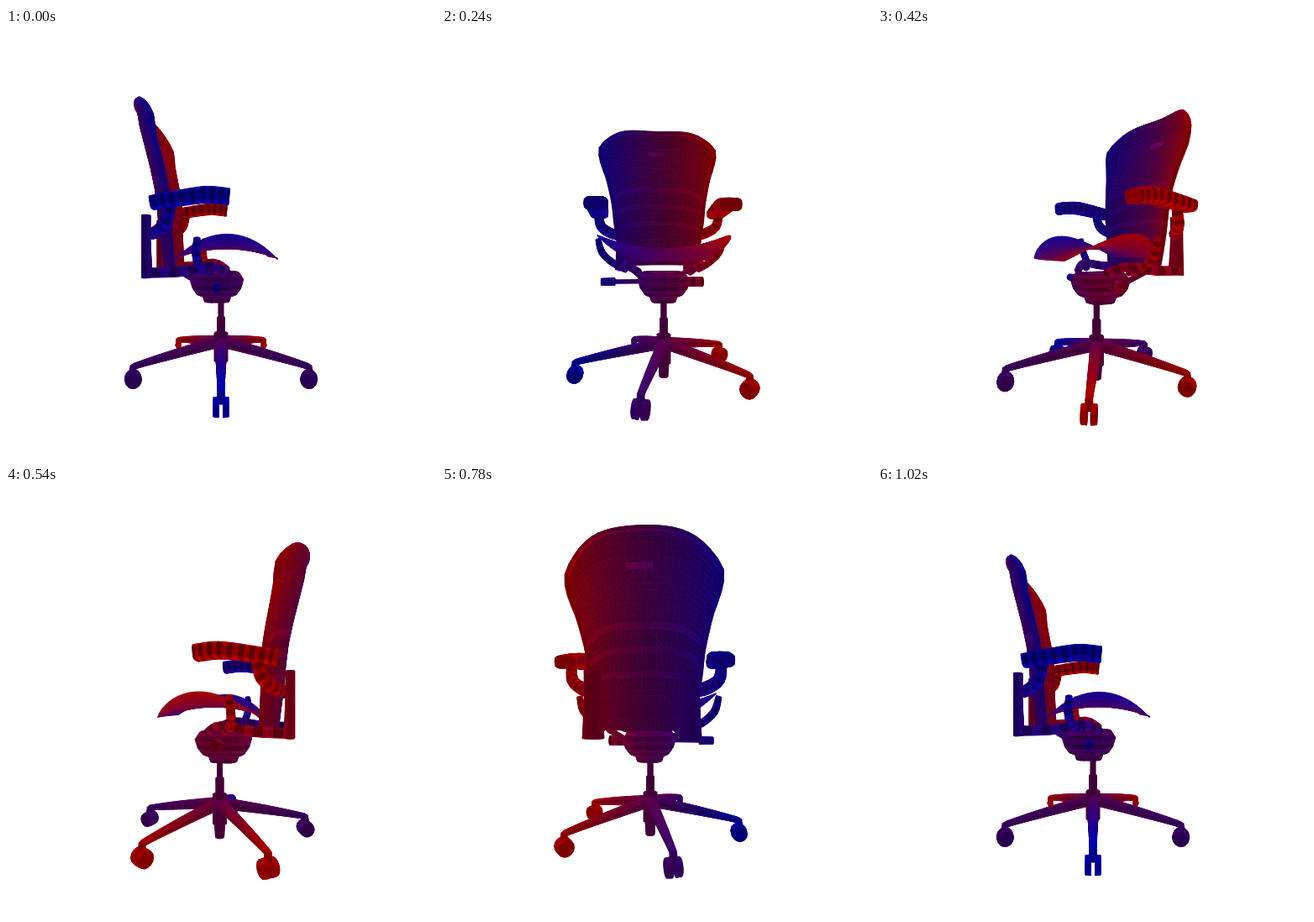
Write an HTML page with a canvas that moves like this. It is 512x512 px and loops after 1.08 s.

```html
<!DOCTYPE html>
<html>
<head>
<meta charset="utf-8">
<title>Turning chair</title>
<style>
html, body { margin: 0; height: 100%; overflow: hidden; background: #fff; }
canvas { display: block; width: 512px; height: 512px; }
</style>
</head>
<body>
<canvas id="stage" width="512" height="512"></canvas>
<script>
const ctx = document.getElementById('stage').getContext('2d');
const CAMERA = 443, MID = 256, SHIFT = -8, STEP = 60, FRAMES = 18;
const UP = [0, 1, 0], AHEAD = [1, 0, 0], SIDE = [0, 0, 1];
const faces = [];

// Vectors: x forward, y up, z towards the blue side
const sub = (a, b) => a.map((n, i) => n - b[i]);
const cross = (a, b) => [a[1] * b[2] - a[2] * b[1], a[2] * b[0] - a[0] * b[2], a[0] * b[1] - a[1] * b[0]];
const unit = a => { const l = Math.hypot(...a) || 1; return a.map(n => n / l); };
const bend = (n, power) => Math.sign(n) * Math.abs(n) ** power;

function sample(list, v) {
  const p = v * (list.length - 1), i = Math.min(Math.floor(p), list.length - 2);
  return list[i] + (list[i + 1] - list[i]) * (p - i);
}

function spline(path, t) {
  const last = path.length - 1;
  const i = Math.max(0, Math.min(Math.floor(t), last - 1)), f = t - i;
  const [a, b, c, d] = [-1, 0, 1, 2].map(k => path[Math.max(0, Math.min(last, i + k))]);
  return b.map((n, k) => n + f / 2 * (c[k] - a[k] +
    f * (2 * a[k] - 5 * n + 4 * c[k] - d[k] + f * (3 * (n - c[k]) + d[k] - a[k]))));
}

function grid(point, nu, nv, tone = () => 1, wheel = false) {
  for (let i = 0; i < nu; i++) for (let j = 0; j < nv; j++) {
    const at = (a, b) => point((i + a) / nu, (j + b) / nv);
    faces.push({ pts: [at(0, 0), at(1, 0), at(1, 1), at(0, 1)], tone: tone(i, j), wheel });
  }
}

// A tube through points [x, y, z, radius]; flat widens it along ref, a low power squares it
function tube(path, { ref = SIDE, flat = 1, power = 1, steps = 4, sides = 10, tone, wheel = false } = {}) {
  const last = path.length - 1;
  const skin = (u, v) => {
    const t = u * last, p = spline(path, t), a = v * 2 * Math.PI;
    const dir = unit(sub(spline(path, t + .02), spline(path, t - .02)).slice(0, 3));
    const m = unit(cross(dir, ref)), n = cross(m, dir);
    const c = bend(Math.cos(a), power), s = flat * bend(Math.sin(a), power);
    return [0, 1, 2].map(k => p[k] + p[3] * (m[k] * c + n[k] * s));
  };
  grid(skin, last * steps, sides, tone, wheel);
  for (const u of [0, 1]) {
    const pts = Array.from({ length: sides }, (_, j) => skin(u, j / sides));
    faces.push({ pts, tone: 1, wheel });
  }
}

const bands = i => i % 2 ? .78 : 1.15;

function buildBase() {
  tube([[0, -70, 0, 3], [0, -94, 0, 3]]);
  tube([[0, -90, 0, 4.5], [0, -112, 0, 4.5]]);
  tube([[0, -109, 0, 8], [0, -143, 0, 8]], { steps: 6 });
  tube([[0, -143, 0, 6], [0, -159, 0, 5]]);
  for (let k = 0; k < 5; k++) {
    const a = k * 2 * Math.PI / 5, s = Math.sin(a), c = Math.cos(a), tangent = [c, 0, -s];
    const out = (r, y, w, side = 0) => [r * s + side * c, y, r * c - side * s, w];
    tube([out(5, -120, 6.5), out(55, -129, 5), out(99, -138, 3.3), out(104, -141, 3.3), out(104, -149, 3.3)],
      { ref: tangent });
    for (const w of [-1, 1])
      tube([out(104, -153, 9, w * 2), out(104, -153, 8.5, w * 7)],
        { ref: UP, steps: 1, sides: 14, wheel: true });
  }
}

function buildMechanism() {
  const rings = [[6, -36], [27, -36], [32, -44], [29, -54], [24, -61], [17, -64], [15, -70], [2, -71]];
  grid((u, v) => {
    const a = v * 2 * Math.PI, r = sample(rings.map(p => p[0]), u);
    return [-5 + r * bend(Math.cos(a), .65), sample(rings.map(p => p[1]), u), r * .95 * bend(Math.sin(a), .65)];
  }, 14, 20, i => i % 2 ? .8 : 1.1);
  tube([[-4, -46, 25, 2], [-4, -46, 60, 2]], { ref: UP });
  tube([[-4, -46, 58, 4.5], [-4, -46, 74, 4]], { ref: UP });
  tube([[-4, -47, -28, 5.5], [-4, -47, -48, 5.5]], { ref: UP, tone: bands });
}

function buildSeat() {
  grid((u, v) => {
    const a = 2 * u - 1, b = 2 * v - 1;
    return [
      6 + 61 * a - 5 * a * b * b,
      -7 - 11 * a * a + 16 * b * b * (1 - a * a),
      78 * b * Math.sqrt(1 - .75 * a * a)
    ];
  }, 20, 24);
}

function back(u, v) {
  return [
    sample([-68, -71, -74, -76, -79, -84, -90, -96, -100], v) + (16 + 14 * v) * u * u,
    -30 + v * (190 - 31 * u ** 4),
    u * sample([48, 52, 55, 58, 60, 64, 69, 76, 78], v)
  ];
}

function buildBack() {
  grid((u, v) => back(2 * u - 1, v), 24, 32, (i, j) => {
    if (j === 26 && i > 9 && i < 14) return 1.3;
    return j > 5 && j < 19 && j % 4 === 1 ? 1.1 : .95;
  });
  const rim = [];
  for (let k = 0; k <= 8; k++) rim.push([...back(-1, k / 8), 2.5]);
  for (let k = 1; k < 12; k++) rim.push([...back(k / 6 - 1, 1), 2.5]);
  for (let k = 8; k >= 0; k--) rim.push([...back(1, k / 8), 2.5]);
  tube(rim, { ref: AHEAD, steps: 2, sides: 6 });
}

function buildArm(s) {
  tube([[-69, 40, 80 * s, 6.5], [-45, 44, 80 * s, 7], [-15, 48, 80 * s, 7.5], [8, 46, 80 * s, 7.5]],
    { flat: 1.75, power: .5, steps: 6, sides: 16, tone: bands });
  tube([[-50, 38, 80 * s, 5], [-55, 22, 77 * s, 6], [-65, 13, 64 * s, 6.5], [-74, 10, 52 * s, 6]],
    { ref: AHEAD, tone: bands });
  tube([[-81, 30, 48 * s, 4.5], [-81, 0, 48 * s, 4.5], [-80, -37, 48 * s, 5.5]], { flat: 2, steps: 6 });
  tube([[-80, -32, 52 * s, 5], [-45, -31, 52 * s, 5], [-10, -26, 46 * s, 4.5], [8, -34, 30 * s, 4]],
    { ref: UP, tone: bands });
  tube([[-24, 5, 79 * s, 3], [-25, -12, 74 * s, 4], [-22, -25, 60 * s, 4], [-12, -32, 44 * s, 4]],
    { ref: AHEAD, tone: bands });
  tube([[-45, -31, 40 * s, 3], [-25, -46, 22 * s, 3]], { ref: UP });
}

function draw(angle) {
  const cos = Math.cos(angle), sin = Math.sin(angle);
  const turn = ([x, y, z]) => [x * cos - (z + SHIFT) * sin, y, x * sin + (z + SHIFT) * cos];
  const mean = (pts, k) => pts.reduce((sum, p) => sum + p[k], 0) / pts.length;
  const shown = faces.map(face => {
    const pts = face.pts.map(turn);
    const x = mean(pts, 0), y = mean(pts, 1), z = mean(pts, 2);
    return { face, pts, z, far: Math.hypot(x, y, CAMERA - z) };
  }).filter(f => !f.face.wheel || f.z > -87).sort((a, b) => b.far - a.far);

  ctx.fillStyle = '#fff';
  ctx.fillRect(0, 0, 512, 512);
  ctx.lineWidth = .8;
  ctx.lineJoin = 'round';
  for (const { face, pts } of shown) {
    const normal = unit(cross(sub(pts[2], pts[0]), sub(pts[pts.length - 1], pts[1])));
    const shade = 215 * face.tone * (.5 + .28 * Math.abs(normal[1]) + .14 * Math.abs(normal[0]));
    const blue = Math.max(0, Math.min(1, .5 + (mean(face.pts, 2) + SHIFT) / 185));
    ctx.fillStyle = ctx.strokeStyle = `rgb(${shade * (1 - blue)},0,${shade * blue})`;
    ctx.beginPath();
    for (const [x, y, z] of pts) {
      const scale = CAMERA / (CAMERA - z);
      ctx.lineTo(MID + x * scale, MID - y * scale);
    }
    ctx.closePath();
    ctx.fill();
    ctx.stroke();
  }
}

buildBase();
buildMechanism();
buildSeat();
buildBack();
buildArm(1);
buildArm(-1);

// The last step repeats the first pose, so a full turn takes one step less
const start = performance.now();
let current = -1;
function tick() {
  const step = Math.floor((performance.now() - start) / STEP) % FRAMES;
  if (step !== current) draw(step * 2 * Math.PI / (FRAMES - 1));
  current = step;
  requestAnimationFrame(tick);
}
tick();
</script>
</body>
</html>
```
